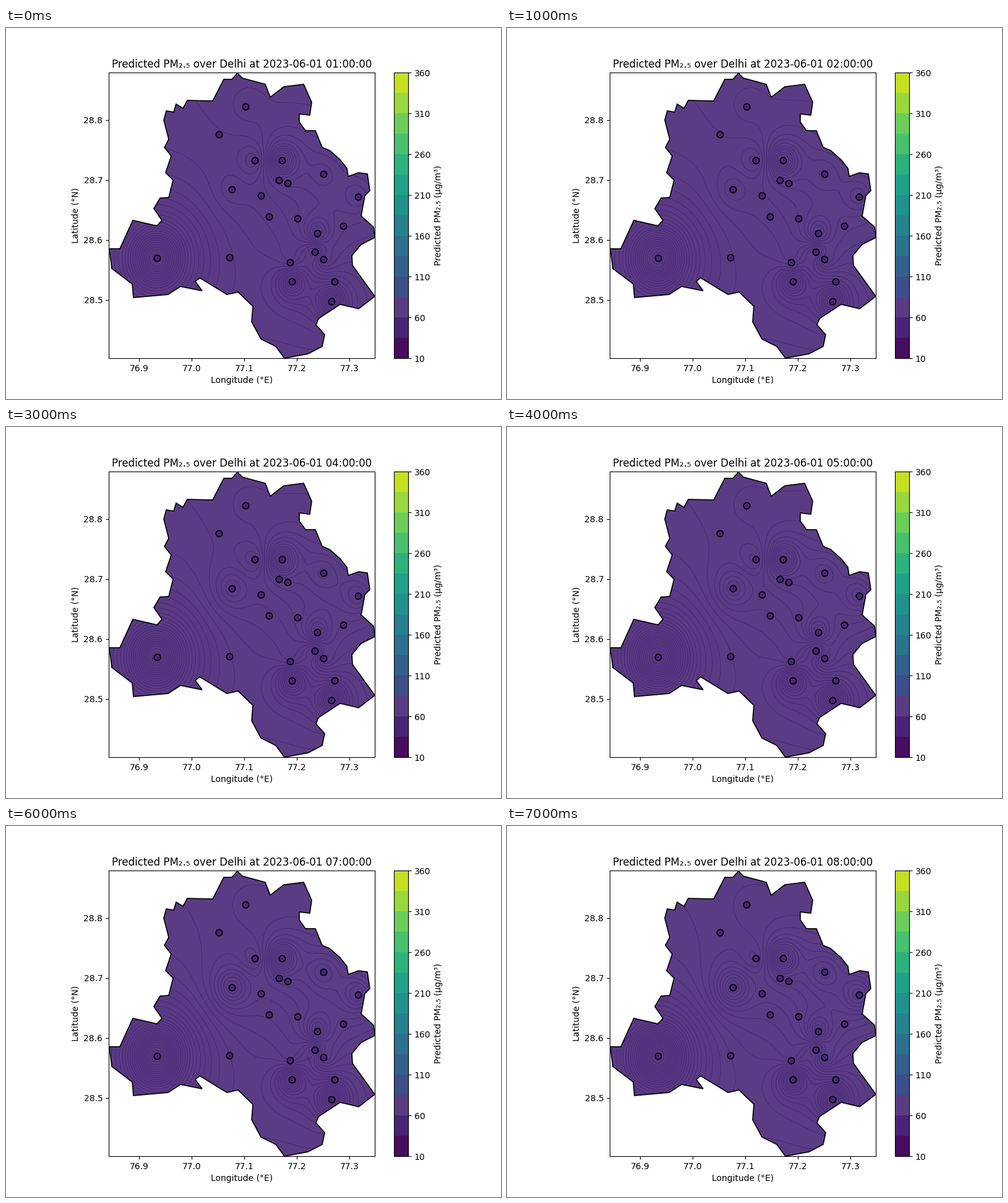
Recreate the animation shown at these times as a matplotlib script. Size 800 by 600 pixels, loop 8000 ms.

```python
import numpy as np
import matplotlib.pyplot as plt
from matplotlib.animation import FuncAnimation
from matplotlib.cm import ScalarMappable
from matplotlib.colors import BoundaryNorm, ListedColormap, Normalize
from matplotlib.patches import Polygon

plt.rcParams["font.family"] = "DejaVu Sans"

HOURS = 8
BASE, STEP = 50, 0.25  # background concentration and gap between isolines

# x, y on the stage, then the height in isolines at the first and last hour
PEAKS = np.array([
    (387, 127, 1.4, 0.8), (402, 214, -5, -4), (445.5, 214, 12, 12),
    (365, 261, 2, 9), (502.5, 332, 8, 9), (499, 362, -8, -8),
    (513, 374, 6, 7), (459, 378.5, 4, 4), (462, 409.5, -11, -12),
    (525.5, 441.5, -12, -14), (512.5, 236, 3, 6), (568.5, 272.5, 4, 8),
    (243.5, 372, -22, -25),
])
QUIET = [
    (343.5, 172), (441, 246), (454.5, 250.5), (411.5, 271), (424.5, 304.5),
    (471, 307.5), (531, 410), (544.5, 320), (361, 371),
]

# Corners of the border, clockwise from the northern tip
BORDER = [
    (374, 73), (382, 81), (419, 91), (427, 112), (449, 95), (481, 91),
    (494, 120), (491, 141), (474, 139), (474, 152), (484, 166), (500, 166),
    (511, 193), (523, 198), (540, 213), (551, 227), (553, 240), (570, 234),
    (584, 236), (588, 263), (580, 271), (574, 304), (594, 322), (596, 339),
    (574, 350), (559, 368), (560, 384), (596, 434), (570, 454), (540, 447),
    (505, 470), (501, 480), (515, 496), (511, 515), (488, 527), (450, 534),
    (436, 515), (412, 503), (397, 475), (399, 450), (375, 427), (357, 431),
    (313, 404), (306, 410), (317, 425), (282, 418), (262, 431), (206, 436),
    (204, 414), (171, 389), (167, 357), (184, 357), (205, 311), (244, 320),
    (252, 311), (239, 292), (249, 275), (263, 274), (270, 246), (258, 234),
    (267, 207), (256, 193), (263, 180), (255, 149), (259, 134), (271, 136),
    (275, 123), (286, 130), (293, 117), (334, 118), (352, 83), (365, 83),
]

PX_LON, PX_LAT = 850, 970  # stage pixels per degree


def to_deg(points):
    """Stage pixels to longitude and latitude."""
    x, y = np.asarray(points, float).T
    return np.column_stack([77 + (x - 300) / PX_LON,
                            28.8 - (y - 148.8) / PX_LAT])


def dist2(x, y, sites):
    """Squared distance to every site, in pixels along the longitude."""
    return PX_LON ** 2 * ((x[..., None] - sites[:, 0]) ** 2
                          + (y[..., None] - sites[:, 1]) ** 2)


peaks = to_deg(PEAKS[:, :2])
sites = np.vstack([peaks, to_deg(QUIET)])
(west, north), (east, south) = to_deg([(166, 72), (596, 534)])

# Each peak is a bell that widens with the distance to its nearest neighbour
nearest = np.sqrt(np.sort(dist2(*peaks.T, sites), axis=1)[:, 1])
radius = 14 + 0.26 * nearest
gx, gy = np.meshgrid(np.linspace(west, east, 260),
                     np.linspace(south, north, 280))
bells = 1 / (1 + dist2(gx, gy, peaks) / radius ** 2)

viridis = plt.get_cmap("viridis")
norm = Normalize(10, 380)
soft = ListedColormap(0.9 * viridis(np.linspace(0, 1, 256))[:, :3] + 0.1)
levels = BASE + STEP * (np.arange(-34, 24) + 0.5)

fig = plt.figure(figsize=(8, 6), dpi=100, facecolor="white")
ax = fig.add_axes([166 / 800, 0.11, 430 / 800, 0.77])
ax.set(xlim=(west, east), ylim=(south, north),
       xticks=[76.9, 77.0, 77.1, 77.2, 77.3],
       yticks=[28.5, 28.6, 28.7, 28.8],
       xlabel="Longitude (°E)", ylabel="Latitude (°N)")
title = ax.set_title("")

border = to_deg(BORDER)
land = ax.add_patch(Polygon(border, fc=soft(norm(BASE)), ec="none", zorder=0))
ax.add_patch(Polygon(border, fc="none", ec="black", lw=1.2, zorder=3))
ax.scatter(*sites.T, s=55, color=viridis(norm(BASE)), edgecolors="black",
           linewidths=1.2, zorder=4)

edges = np.arange(10, 361, 25)
bins = viridis(norm((edges[:-1] + edges[1:]) / 2))
bins[2] = soft(norm(BASE))
bar_axes = fig.add_axes([627 / 800, 0.11, 23.1 / 800, 0.77])
bar = fig.colorbar(
    ScalarMappable(BoundaryNorm(edges, len(bins)), ListedColormap(bins)),
    cax=bar_axes, ticks=edges[::2], label="Predicted PM₂.₅ (µg/m³)")
bar.minorticks_off()

layers = []


def draw(i):
    first, last = PEAKS[:, 2:].T
    heights = first + (last - first) * i / (HOURS - 1)
    field = BASE + STEP * (bells @ heights)
    while layers:
        layers.pop().remove()
    layers.append(ax.contourf(gx, gy, field, levels, cmap=soft, norm=norm,
                              zorder=1))
    layers.append(ax.contour(gx, gy, field, levels, linewidths=0.65,
                             colors=[viridis(norm(BASE))], zorder=2))
    for layer in layers:
        layer.set_clip_path(land)
    title.set_text(f"Predicted PM₂.₅ over Delhi at 2023-06-01 {i + 1:02d}:00:00")
    return [title]


anim = FuncAnimation(fig, draw, frames=HOURS, interval=1000,
                     init_func=lambda: [], repeat=True, repeat_delay=0)
plt.show()
```
